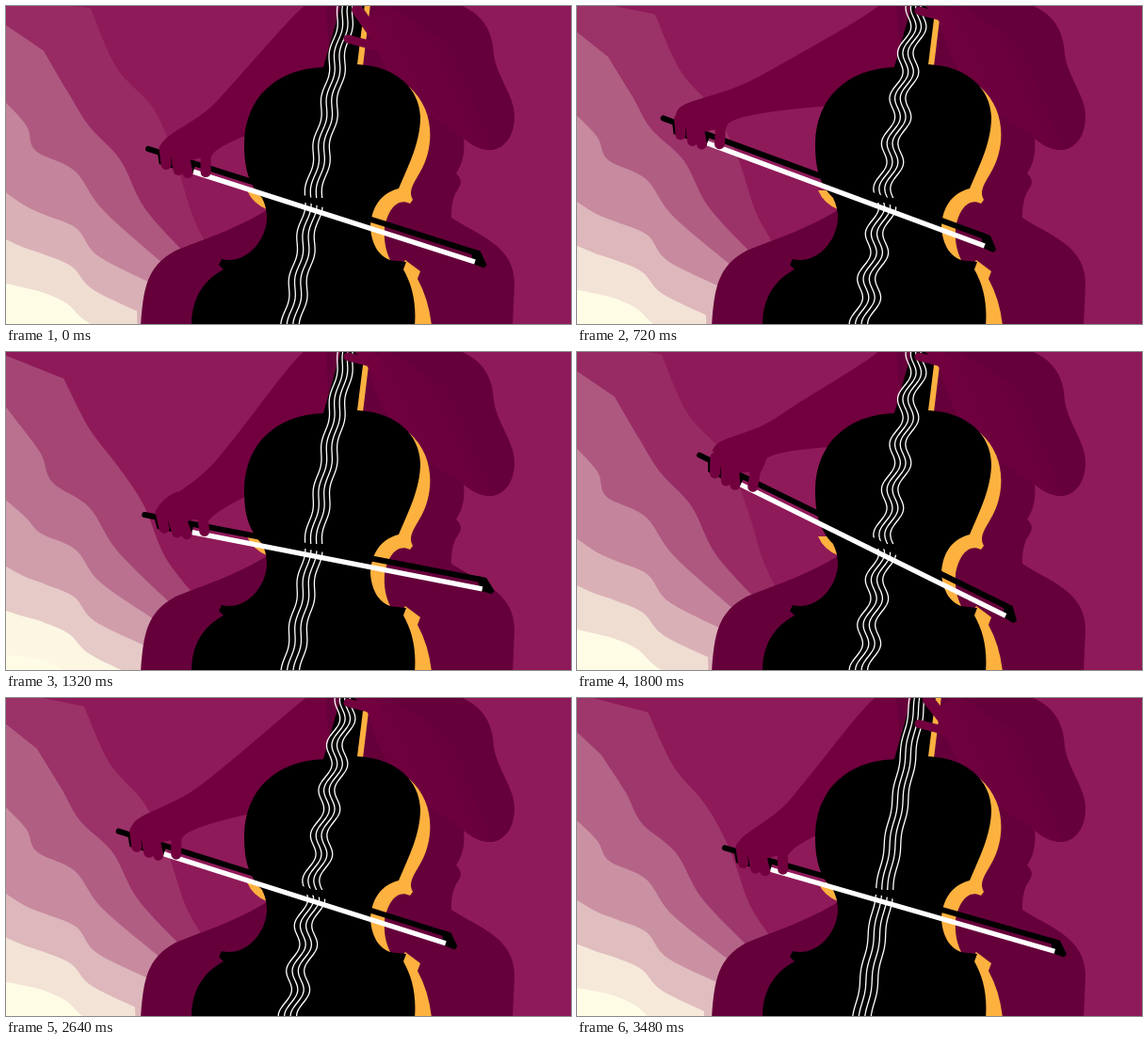
These frames come from a looping animation (600 px wide and 338 px high, 3600 ms). An HTML page with a canvas:

```html
<!DOCTYPE html>
<html lang="en">
<head>
<meta charset="utf-8">
<title>Cellist</title>
<style>
html, body { margin: 0; width: 100%; height: 100%; overflow: hidden; background: #8f1a59; }
canvas { display: block; }
</style>
</head>
<body>
<canvas id="stage" width="600" height="338"></canvas>
<script>
const ctx = document.getElementById('stage').getContext('2d');
const STEP = 120, STEPS = 30, DEG = Math.PI / 180;
const SKIN = '#72003f', DARK = '#66003b', GOLD = '#fdb13f';
const BACK = [143, 26, 89], CREAM = [255, 252, 230];
const BRIDGE = { x: 326, y: 212 };

// Glow contours: each band passes through these shapes as it ages and spreads
const contours = [
  { age: 1, pts: '97,-4 125,62 166,106 187,160 204,220 214,248' },
  { age: -1, pts: '-3,86 22,115 30,144 72,166 104,210 170,272' },
  { age: -2.2, pts: '-3,202 20,217 42,226 75,240 97,268 154,296' },
  { age: -5, pts: '-3,335 20,336 40,340 60,350 80,365 110,380' }
].map(c => ({ age: c.age, pts: c.pts.split(' ').map(p => p.split(',').map(Number)) }));

// Ends of the bow strokes: how far the bow is drawn, and its tilt in degrees
const strokes = [
  { at: 0, pull: 186, tilt: 17.6 },
  { at: 6, pull: 253, tilt: 20.2 },
  { at: 11, pull: 184, tilt: 10.9 },
  { at: 15, pull: 222, tilt: 26.2 },
  { at: 19, pull: 193, tilt: 20.4 },
  { at: 25, pull: 245, tilt: 14.5 },
  { at: 29, pull: 178, tilt: 15.9 }
];
strokes.push({ ...strokes[0], at: STEPS });

const torso = new Path2D(`M320,-2 L480,-2 L486,140 C488,160 483,170 478,178 Q486,185 481,193
  Q472,205 473,225 C500,243 540,254 540,295 L538,340 L143,340 C146,300 149,277 180,260
  C215,246 250,235 285,212 L300,80 Z`);
const upperArm = new Path2D(`M430,-4 L480,-2 C506,8 517,26 518,52 C521,72 535,90 539,108
  C543,130 534,150 517,153 C505,153 496,149 486,140 L400,70 Z`);
const foreArm = new Path2D('M384,12 L402,-4 L470,40 L517,153 C500,154 490,144 480,136 C452,117 400,90 384,12 Z');
const side = new Path2D(`M379,-2 L387,-2 L379,64 L371,64 Z
  M428,86 C456,110 455,150 440,176 C432,190 427,197 432,206 L429,210
  C415,203 405,218 402,236 C401,252 404,262 409,272 L396,268 L380,235 L390,200 L412,190 Z
  M424,270 L440,282 L437,290 Q449,312 452,340 L430,340 L418,278 Z
  M256,196 L276,196 L277,216 Q262,210 256,196 Z`);
const cello = new Path2D(`M356,-2 L381,-2 L373,62 C415,64 439,88 440,118 C440,145 428,168 417,194
  C397,199 388,215 387,235 C388,252 396,271 416,271 L425,272 L422,280 C431,296 436,315 434,340
  L197,340 C197,311 209,292 231,280 L226,275 L229,269 C255,275 276,250 277,226
  C277,214 274,209 272,204 C255,187 253,166 253,146 C254,97 287,67 337,65 Z`);

const lerp = (a, b, k) => a + (b - a) * k;
const mix = (a, b, k) => a.map((v, i) => lerp(v, b[i], k));

function spline(p) {
  ctx.beginPath();
  ctx.moveTo(...p[0]);
  for (let i = 0; i < p.length - 1; i++) {
    const a = p[i - 1] || p[i], b = p[i], c = p[i + 1], d = p[i + 2] || c;
    ctx.bezierCurveTo(b[0] + (c[0] - a[0]) / 6, b[1] + (c[1] - a[1]) / 6,
      c[0] - (d[0] - b[0]) / 6, c[1] - (d[1] - b[1]) / 6, ...c);
  }
}

function line(color, width, cap, ...pts) {
  ctx.strokeStyle = color;
  ctx.lineWidth = width;
  ctx.lineCap = cap;
  ctx.beginPath();
  pts.forEach(p => ctx.lineTo(...p));
  ctx.stroke();
}

function fill(color, path) {
  ctx.fillStyle = color;
  path ? ctx.fill(path) : ctx.fill();
}

function polygon(color, s) {
  fill(color, new Path2D('M' + s + 'Z'));
}

// Draw in a frame that sits at x, y and is turned by an angle
function placed(x, y, angle, paint) {
  ctx.save();
  ctx.translate(x, y);
  ctx.rotate(angle);
  paint();
  ctx.restore();
}

function drawGlow(i) {
  const phase = (i % 8 ? i % 8 - 1 : 6) / 7;
  for (let age = phase + 1; age > -5; age--) {
    const shade = (1.25 - age) / 5.1;
    if (shade <= 0) continue;
    const n = Math.max(1, contours.findIndex(c => c.age <= age)), a = contours[n - 1], b = contours[n];
    const k = (a.age - age) / (a.age - b.age);
    spline(a.pts.map((p, j) => mix(p, b.pts[j], k)));
    ctx.lineTo(140, 400);
    ctx.lineTo(-60, 400);
    ctx.lineTo(-60, -20);
    fill(`rgb(${mix(BACK, CREAM, Math.min(1, shade)).map(Math.round)})`);
  }
}

// The elbow follows the hand at a reduced rate
function drawBowArm(x, y) {
  const ex = 243 + (x - 150) * .4, ey = 76 + (y - 145) * .6;
  const wx = x + 25, wy = y - 15;
  spline([[338, -16], [306, 10], [ex, ey], [(ex + wx) / 2 + 4, (ey + wy) / 2 + 3], [wx, wy], [x + 14, y - 4]]);
  ctx.lineTo(x + 68, y + 8);
  ctx.quadraticCurveTo(x + 74, y - 5, ex + 45, ey + 46);
  ctx.lineTo(345, 70);
  fill(SKIN);
}

function drawStrings(swing) {
  for (const [top, end] of [[-4, 205], [209, 340]])
    for (let s = -1.5; s < 2; s++) {
      const pts = [];
      for (let y = top; y <= end; y += 2)
        pts.push([362 - y * .173 + s * (5.3 + y * .0035) - swing * Math.cos(y * 2 * Math.PI / 48), y]);
      line('#fff', 1.3, 'butt', ...pts);
    }
}

function drawBow() {
  line('#000', 6, 'round', [1, 0], [364, 0]);
  polygon('#000', '11,0 L17,12 54,12 54,0');
  polygon('#000', '360,-3 L370,-3 381,9 379,13 366,12');
  line('#fff', 5.3, 'butt', [54, 8.7], [368, 9.6]);
}

function drawBowHand() {
  polygon(SKIN, '13,0 C16,-9 25,-16 38,-20 L72,-12 Q72,0 67,10 L56,10 48,12 40,14 30,12 25,10 14,8');
  for (const [x, lean, length] of [[18, 2, 17], [29, 4, 23], [37, 6, 26], [62, 0, 25]])
    line(SKIN, 11, 'round', [x, 0], [x + lean, length]);
}

function drawFarArm() {
  const shade = ctx.createLinearGradient(400, 70, 490, 30);
  shade.addColorStop(0, '#70003f');
  shade.addColorStop(1, DARK);
  fill(DARK, upperArm);
  fill(shade, foreArm);
}

function drawNeckHand(slide) {
  line(SKIN, 9, 'round', [363, 5 + slide], [386, 11 + slide], [398, 28 + slide * .5]);
  line(SKIN, 12, 'round', [373, -5 + slide * .3], [392, 10 + slide * .7]);
}

function draw(i) {
  const n = strokes.findIndex(s => s.at > i), a = strokes[n - 1], b = strokes[n];
  const k = (i - a.at) / (b.at - a.at);
  const pull = lerp(a.pull, b.pull, k), tilt = lerp(a.tilt, b.tilt, k) * DEG;
  const x = BRIDGE.x - pull * Math.cos(tilt + .024), y = BRIDGE.y - pull * Math.sin(tilt + .024);
  const swing = Math.min(4.8, 1 + Math.max(0, pull - 178) * .13);
  const slide = 30 * Math.max(0, 1 - Math.min(i, STEPS - i) / 4);

  ctx.fillStyle = `rgb(${BACK})`;
  ctx.fillRect(0, 0, 600, 338);
  drawGlow(i);
  fill(DARK, torso);
  drawBowArm(x, y);
  drawFarArm();
  fill(GOLD, side);
  fill('#000', cello);
  drawStrings(swing);
  drawNeckHand(slide);
  placed(x, y, tilt, drawBow);
  placed(x, y, tilt - 17.6 * DEG, drawBowHand);
}

const start = performance.now();
function tick() {
  draw(Math.floor((performance.now() - start) / STEP) % STEPS);
  requestAnimationFrame(tick);
}
tick();
</script>
</body>
</html>
```
